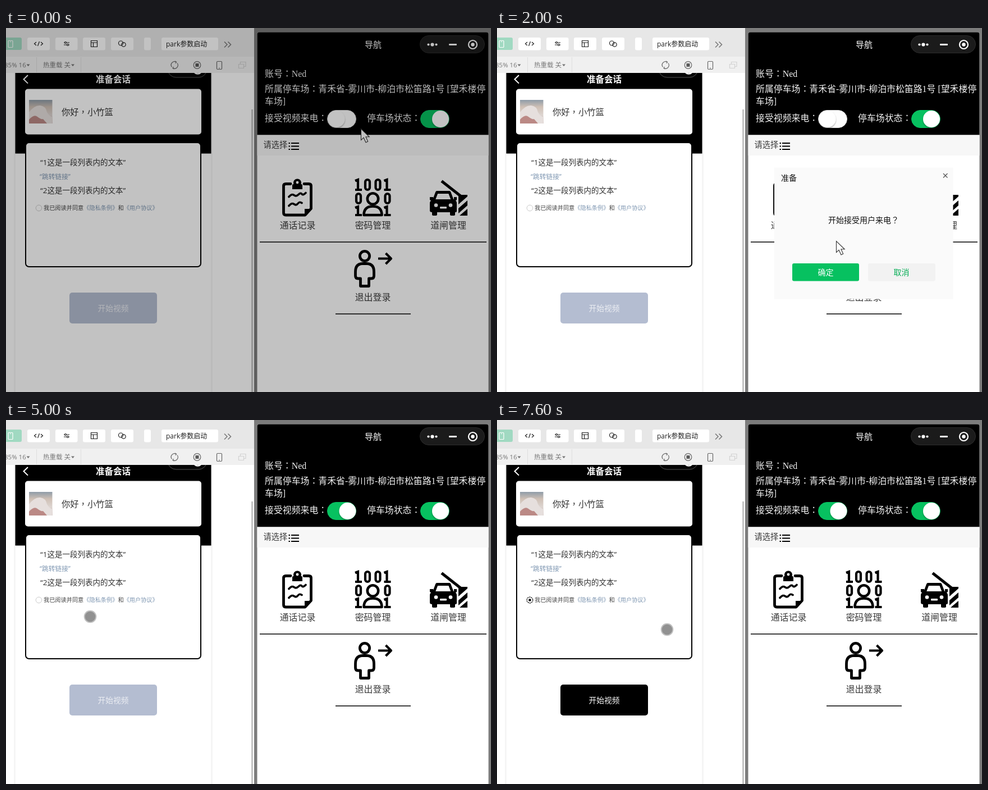
An HTML page that plays this animation: 864x648 px, repeating every 8 s.

```html
<!DOCTYPE html>
<html lang="zh-CN">
<head>
<meta charset="utf-8">
<title>导航</title>
<style>
html, body { margin: 0; width: 100%; height: 100%; overflow: hidden; background: #fff; }
svg { display: block; width: 100%; height: 100%; }
text { font-family: "Open Sans", "Noto Sans CJK SC", "Noto Sans CJK", sans-serif; white-space: pre; }
.serif text { font-family: "Liberation Serif", "Noto Sans CJK SC", "Noto Sans CJK", serif; font-weight: 300; }
text .mark { font-family: "Noto Sans CJK TC", "Noto Sans CJK", sans-serif; }
.mid { text-anchor: middle; }
.line { fill: none; stroke: #000; }
.link { fill: #7f97b2; }
</style>
</head>
<body>
<svg id="stage" viewBox="0 0 864 648" xmlns="http://www.w3.org/2000/svg">
  <defs>
    <clipPath id="below"><rect x="0" y="80" width="437" height="568"/></clipPath>
    <linearGradient id="portrait" x1="0" y1="0" x2="0" y2="1">
      <stop offset="0" stop-color="#8f9ca8"/><stop offset=".3" stop-color="#cfc0b5"/>
      <stop offset=".65" stop-color="#ddd5d1"/><stop offset="1" stop-color="#a8817b"/>
    </linearGradient>
    <filter id="soft" x="-30%" y="-30%" width="160%" height="160%">
      <feDropShadow dx="0" dy="1.5" stdDeviation="1.3" flood-opacity=".4"/>
    </filter>
  </defs>
  <rect width="864" height="648" fill="#fff"/>

  <!-- tool bars -->
  <rect width="442" height="51" fill="#e7e7e7"/>
  <rect y="51" width="442" height="29" fill="#f0f0f0"/>
  <g id="tabs" fill="#fff"></g>
  <rect x="-12" y="17" width="40" height="22" rx="3" fill="#a0d9c1"/>
  <g fill="none" stroke="#fff" stroke-width="1.2">
    <rect x="4" y="22.500" width="8" height="12" rx="1"/><path d="M7 24.500h2"/>
  </g>
  <g fill="none" stroke="#222" stroke-width="1.2">
    <path d="M54 25l-3.500 3 3.500 3M62 25l3.500 3-3.500 3M59.500 24l-3 8"/>
    <path d="M103 26h1.500M107.500 26h5.500M103 30h5.500M111.500 30h1.500"/>
    <circle cx="106" cy="26" r="1.500"/><circle cx="110" cy="30" r="1.500"/>
    <path d="M151.500 22.500h11v11h-11zM151.500 26h11M155.500 26v7.500"/>
    <circle cx="204.500" cy="27" r="4"/><circle cx="209.500" cy="29.500" r="3.700"/>
  </g>
  <text x="285" y="33" font-size="12" fill="#222">park参数启动</text>
  <path d="M389 24.500l5 5-5 5M395.500 24.500l5 5-5 5" fill="none" stroke="#777" stroke-width="1.500"/>
  <g font-size="11.500" fill="#777">
    <text x="-3" y="69.500">85% 16</text><text x="66" y="69.500">热重载 关</text>
    <path d="M36.500 64.500h6l-3 3.700zM116 64.500h6l-3 3.700z"/>
  </g>
  <path d="M54.500 52v27M133.500 52v27" stroke="#dedede"/>
  <g fill="none" stroke="#666" stroke-width="1.200">
    <path d="M295.500 69.500a6 6 0 0 1 7.500-9M305 62.500a6 6 0 0 1-7.500 9M301 59l2.500 1.500-1.500 2.500M299.500 73l-2.500-1.500 1.500-2.500"/>
    <circle cx="340.500" cy="66" r="6.300"/><rect x="338" y="63.500" width="5" height="5" fill="#555"/>
    <rect x="375.500" y="59.500" width="9" height="14" rx="1.500"/><path d="M379 71.500h2"/>
    <path d="M417.500 64v-3.500h9.500v8h-3.500M414.500 64.500h9v7h-9z" stroke="#d2d2d2"/>
  </g>

  <!-- left phone -->
  <g clip-path="url(#below)">
    <path d="M15.500 80v568M366.500 80v568" stroke="#f5f5f5" stroke-width="3"/>
    <rect x="16.500" y="80" width="349" height="143.500" fill="#000"/>
    <path d="M39 84l-7.500 7.300 7.500 7.300" fill="none" stroke="#fff" stroke-width="2"/>
    <text class="mid" x="191" y="96.700" font-size="15.500" font-weight="700" fill="#fff">准备会话</text>
    <rect x="288" y="58" width="70" height="30" rx="15" fill="#060606" stroke="#555"/>
    <circle cx="341.500" cy="74" r="7.500" fill="none" stroke="#fff" stroke-width="2.500"/>
    <rect x="34" y="108.500" width="314" height="81" rx="5" fill="#fff"/>
    <rect x="41" y="128" width="41.500" height="42" fill="url(#portrait)"/>
    <path d="M41 150q10-13 20-12t12 12q5 8 9.500 8v12H41z" fill="#e6dfdd"/>
    <path d="M41 163q9-10 15-5t10 4l7 8H41z" fill="#a8645f" opacity=".7"/>
    <text x="99" y="155" font-size="15.300" fill="#333">你好<tspan class="mark" lang="zh-TW">，</tspan>小竹篮</text>
    <rect x="35" y="204" width="312" height="221" rx="6" fill="#fff" stroke="#000" stroke-width="2"/>
    <text x="61" y="244" font-size="13.500" fill="#333">“1这是一段列表内的文本”</text>
    <text class="link" x="60" y="268.500" font-size="11.700">“跳转链接”</text>
    <text x="61" y="294" font-size="13.500" fill="#333">“2这是一段列表内的文本”</text>
    <circle id="ring" cx="58.500" cy="320.500" r="5.300" fill="none"/>
    <circle id="pip" cx="58.500" cy="320.500" r="2.300"/>
    <text x="67" y="324.300" font-size="10.200" fill="#444">我已阅读并同意<tspan class="link">《隐私条例》</tspan>和<tspan class="link">《用户协议》</tspan></text>
    <rect id="start" x="113" y="471" width="156" height="55" rx="5"/>
    <text id="startText" class="mid" x="191" y="504" font-size="13.700">开始视频</text>
  </g>
  <rect x="437" y="145" width="3" height="503" fill="#c3c3c3"/>

  <!-- right phone -->
  <rect x="442" width="422" height="648" fill="#7c7c7c"/>
  <path d="M447.500 648V11.500q0-4 4-4h404q4 0 4 4v636.500z" fill="#fff"/>
  <path d="M447.500 190.500V11.500q0-4 4-4h404q4 0 4 4v179z"/>
  <rect x="447.500" y="190.500" width="412" height="36.500" fill="#f7f7f7"/>
  <text class="mid" x="654" y="35" font-size="15" font-weight="500" fill="#fff">导航</text>
  <rect x="737.500" y="13.500" width="115" height="31" rx="15.500" fill="#1b1b1b" stroke="#2c2c2c"/>
  <g fill="#fff">
    <circle cx="752.500" cy="29.500" r="2.100"/><circle cx="759.500" cy="29.500" r="3.100"/><circle cx="766.500" cy="29.500" r="2.100"/>
    <rect x="789" y="28" width="14" height="3" rx="1"/>
    <circle cx="831.500" cy="29.500" r="7.500" fill="none" stroke="#fff" stroke-width="2.200"/><circle cx="831.500" cy="29.500" r="3.200"/>
  </g>
  <g class="serif" font-size="15.900" fill="#f2f2f2">
    <text x="461" y="86.500">账号<tspan class="mark" lang="zh-TW">：</tspan>Ned</text>
    <text x="461" y="114">所属停车场<tspan class="mark" lang="zh-TW">：</tspan>青禾省-雾川市-柳泊市松笛路1号 [望禾楼停</text>
    <text x="461" y="135.500">车场]</text>
    <text x="461" y="165.500">接受视频来电<tspan class="mark" lang="zh-TW">：</tspan></text>
    <text x="643" y="165.500">停车场状态<tspan class="mark" lang="zh-TW">：</tspan></text>
  </g>
  <rect id="track" x="572.500" y="146.500" width="51" height="31" rx="15.500"/>
  <circle id="knob" cy="162" r="15" fill="#fff" filter="url(#soft)"/>
  <rect x="738.500" y="146.500" width="51" height="31" rx="15.500" fill="#07c160" stroke="#07c160"/>
  <circle cx="774" cy="162" r="15" fill="#fff" filter="url(#soft)"/>
  <g class="serif" fill="#3a3a3a">
    <text x="458.500" y="213" font-size="14.300">请选择</text>
    <g class="mid" font-size="15.900">
      <text x="519.500" y="356.500">通话记录</text><text x="653.500" y="356.500">密码管理</text>
      <text x="788" y="356.500">道闸管理</text><text x="653.500" y="485">退出登录</text>
    </g>
  </g>
  <path class="line" stroke-width="2" d="M503.500 205h2.500M508 205h14M503.500 210.500h2.500M508 210.500h14M503.500 216h2.500M508 216h14"/>
  <path class="line" stroke-width="1.500" d="M452 381h404M587 509h134"/>

  <!-- call log -->
  <g class="line" stroke-width="4.800" stroke-linecap="round" stroke-linejoin="round">
    <path d="M507 277.500h-8.500q-4 0-4 4V329q0 4 4 4H533l10.500-11.500v-40q0-4-4-4H531"/>
    <path stroke-width="3.600" d="M504 300.500q5-6 9-3t8-1 6-1 7-2M504 316.500q5-6 9-3t7-1 7-1"/>
  </g>
  <path d="M532 333v-11h12z"/>
  <path d="M510 287v-7q0-2 2-2h.5a7 7 0 1 1 13 0h.5q2 0 2 2v7z"/>
  <circle cx="519" cy="275" r="2.400" fill="#fff"/>

  <!-- passcode -->
  <g class="line" stroke-width="4.200">
    <path id="digits"/>
    <circle cx="653.500" cy="304" r="9.700" stroke-width="4.600"/>
    <path d="M637.500 333q0-15.500 16-15.500t16 15.500z" stroke-width="4.600" stroke-linejoin="round"/>
  </g>

  <!-- barrier -->
  <path class="line" stroke-width="5" d="M776 272.500L811 300"/>
  <path d="M806 297h16v3l-16 14zM822 307v9l-16 14v-9zM822 322v12h-14z"/>
  <path class="line" stroke-width="4.800" stroke-linejoin="round" d="M762 307l5.500-14.500h22.500l5.500 14.500"/>
  <path d="M755 301h6v4h37v-4h5v5l-2 1q2 2 2 6v13q0 2-2 2h-1v4q0 2-2 2h-5q-2 0-2-2v-4h-23v4q0 2-2 2h-5q-2 0-2-2v-4q-4 0-4-3v-12q0-4 2-6l-2-1z"/>
  <g fill="#fff"><circle cx="766" cy="315.500" r="3.300"/><circle cx="792" cy="315.500" r="3.300"/><rect x="773" y="318" width="12" height="3.500" rx="1"/></g>

  <!-- sign out -->
  <g class="line" stroke-width="4.800" stroke-linejoin="round">
    <circle cx="639" cy="406" r="8.600"/>
    <path d="M631.500 459.500V446h-4.500q-4.500 0-4.500-5v-7q0-14 12-14.500h9q12 .5 12 14.500v7q0 5-4.500 5h-4.500v13.500z"/>
    <path d="M663 410.500h22M676.500 401l9.500 9.500-9.500 9.500" stroke-width="4.200"/>
  </g>

  <!-- dialog -->
  <g id="dialog" font-size="14">
    <rect x="494" y="248.500" width="318.500" height="234" fill="#fafafa"/>
    <text x="506" y="271.500" fill="#111">准备</text>
    <path d="M795 259l7.500 7.500M802.500 259l-7.500 7.500" stroke="#555" stroke-width="1.300"/>
    <text x="590" y="347" fill="#111">开始接受用户来电<tspan class="mark" lang="zh-TW">？</tspan></text>
    <rect id="ok" x="526" y="419" width="119" height="31.500" rx="3"/>
    <rect x="661" y="419" width="120" height="31.500" rx="3" fill="#f2f2f2"/>
    <g class="mid"><text x="585.500" y="439.500" fill="#fff">确定</text><text x="720.500" y="439.500" fill="#06ae56">取消</text></g>
  </g>

  <!-- pointers -->
  <g id="pointer">
    <path id="arrow" fill="#fff" stroke="#333" stroke-width="1.100" d="M.5.500v20l4.600-4.300 3.900 8.600 3.700-1.700-3.800-8.300h6.300z"/>
    <path id="hand" fill="#fff" stroke="#222" stroke-width="1.100" d="M-1.600 11V2a1.800 1.800 0 0 1 3.600 0v5.500q2-1 3.100.6 2-.8 3 .9 2.600-.3 2.600 2V15l-1.700 6H.500L-4.500 14q-.8-2.600 1.200-2.600z"/>
    <g id="dot" opacity=".95"><circle r="11.300" fill="#bdbdbd"/><circle r="9.300" fill="#8c8c8c"/></g>
  </g>
  <rect id="shade" width="864" height="648"/>
</svg>
<script>
const LOOP = 8000, STEP = 100;
const $ = id => document.getElementById(id);
const set = (id, attrs) => { for (const k in attrs) $(id).setAttribute(k, attrs[k]); };
const show = (id, on) => set(id, { visibility: on ? "visible" : "hidden" });
const ramp = (t, a, b) => Math.min(1, Math.max(0, (t - a) / (b - a)));
const within = (t, a, b) => t >= a && t < b;

// pointer stops: time, x, y
const path = [
  [0, 632, 179], [100, 638, 181], [300, 626, 172], [400, 614, 166], [500, 608, 163],
  [1000, 608, 163], [1400, 609, 161], [1500, 609, 161], [1700, 618, 200], [2000, 604, 379],
  [2200, 600, 415], [2400, 596, 432], [3300, 596, 432], [3600, 603, 490], [3900, 597, 559],
  [4000, 597, 560], [4100, 592, 560], [4200, 592, 560], [4300, 594, 560], [4500, 594, 560],
  [4700, 480, 490], [5000, 150, 350], [5200, 69, 320], [6100, 69, 320], [6200, 150, 379],
  [6500, 270, 500], [6600, 262, 505], [6800, 235, 503], [7100, 235, 503], [7400, 308, 268],
  [7600, 303, 373]
];

function pointAt(t) {
  const i = path.findIndex(p => p[0] > t);
  if (i < 0) return path[path.length - 1].slice(1);
  const a = path[i - 1], b = path[i], k = ramp(t, a[0], b[0]);
  return [a[1] + (b[1] - a[1]) * k, a[2] + (b[2] - a[2]) * k];
}

const one = (x, y, h) => `M${x} ${y + 4}l5-2v${h - 4}M${x} ${y + h - 2}h12`;
const zero = (x, y, h) => `M${x + 2} ${y + 6}a4 4 0 0 1 8 0v${h - 12}a4 4 0 0 1-8 0z`;

function build() {
  $("tabs").innerHTML = [[38, 40], [88, 39.5], [137, 40], [187, 40], [246, 12], [277, 101]]
    .map(([x, w]) => `<rect x="${x}" y="17" width="${w}" height="22.500" rx="3"/>`).join("");
  set("digits", { d: one(622, 268, 22) + zero(638, 268, 22) + zero(656.5, 268, 22) + one(673.5, 268, 22)
    + zero(622, 293, 21) + zero(673.5, 293, 21) + one(622, 316, 19) + one(673.5, 316, 19) });
}

function draw(t) {
  set("shade", { opacity: t < 700 ? 0.24 : t < 900 ? 0.19 : 0 });

  const open = ramp(t, 1000, 1400) * (1 - ramp(t, 3100, 3400));
  set("dialog", { opacity: open });
  set("ok", { fill: within(t, 2400, 2900) ? "#06ad56" : "#07c160" });

  const on = ramp(t, 3100, 3500);
  set("track", { fill: on ? "#07c160" : "#fdfdfd", stroke: on ? "#07c160" : "#dfdfdf" });
  set("knob", { cx: 588.5 + 20 * on });

  const agreed = t >= 5700, ready = t >= 5800;
  set("ring", { stroke: agreed ? "#111" : "#c8c8c8", "stroke-width": agreed ? 1.4 : 1,
    "stroke-dasharray": agreed ? "2.2 1.1" : "none" });
  show("pip", agreed);
  set("start", { fill: !ready ? "#b4bdd1" : within(t, 7100, 7300) ? "#2b2b2b" : "#000" });
  set("startText", { fill: ready ? "#fff" : "#eceef3" });

  const [x, y] = pointAt(t);
  const touch = x < 365;
  const grab = within(t, 400, 1600) || within(t, 2300, 3400);
  set("pointer", { transform: `translate(${x} ${y})` });
  show("dot", touch);
  show("hand", !touch && grab);
  show("arrow", !touch && !grab);
}

build();
const begin = performance.now();
function tick() {
  const t = (performance.now() - begin) % LOOP;
  draw(Math.floor(t / STEP) * STEP);
  requestAnimationFrame(tick);
}
tick();
</script>
</body>
</html>
```
